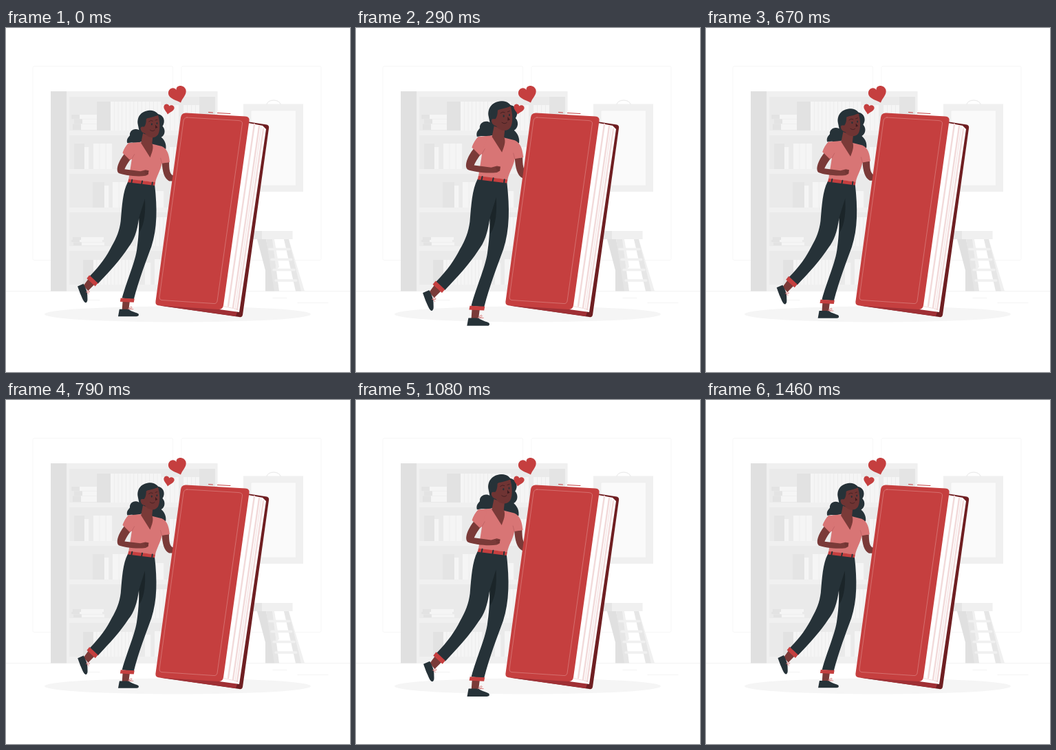
Animation of 500 by 500 pixels, one loop 1.5 s. Source, as an HTML page:

```html
<!DOCTYPE html>
<html lang="en">
<head>
<meta charset="utf-8">
<title>Reader and book</title>
<style>
html, body { margin: 0; height: 100%; overflow: hidden; background: #fff; }
svg { display: block; width: 100vw; height: 100vh; }
.dark { fill: #263238; }
.skin { fill: #7a3a38; }
.face { fill: #6f3433; }
.red { fill: #c53f3f; }
.shirt { fill: #d87575; }
.line { fill: none; stroke-linecap: round; }
</style>
</head>
<body>
<svg viewBox="0 0 500 500">
  <g class="line" stroke="#f5f5f5" stroke-width=".8">
    <rect x="39" y="55.5" width="203.5" height="282" rx="2"/>
    <rect x="255" y="55.5" width="203" height="282" rx="2"/>
    <path stroke="#f0f0f0" d="M0 382.500H500M388 392.500h20M424 399.500h44M110 395.500h26"/>
  </g>

  <path fill="#e0e0e0" d="M65 92h23v290.500H65z"/>
  <path fill="#f0f0f0" d="M88 92h219.500v290.500H88z"/>
  <g id="shelves"></g>

  <path fill="#f0f0f0" d="M345 110.500h87V238h-87z"/>
  <path fill="#fafafa" stroke="#ebebeb" stroke-width=".6" d="M356 120h65.500v109H356z"/>
  <path class="line" stroke="#e6e6e6" d="M379 110.500C381 103 397 103 399 110.500"/>

  <path fill="#e0e0e0" d="M365 307h13l12 58v17.500h-13v-30z"/>
  <path fill="#f0f0f0" d="M358 295h58.500v12H358zM386 307h4l7 40-4 5zM404 307h7l23 75.500h-8z"/>
  <path fill="#e6e6e6" d="M358 295h14v12h-14zM378 307h9l10 75.500h-7zM404 307h7l18 75.500h-8z"/>
  <path class="line" stroke="#f0f0f0" stroke-width="3.500" d="M383 321.500h29M386 336.500h29M389 351.500h30M392 367h30"/>

  <ellipse cx="249.500" cy="416" rx="193.500" ry="11.500" fill="#f5f5f5"/>

  <g id="woman">
    <!-- Hair behind the face -->
    <path class="dark" d="M192 132C191 119 200 112 212 112C218 112.500 221 115 223 117.500C232 119 235 129 230 136C235 141 234 150 228 153C234 158 236 165 235 171C227 169 218 170 213 166L201 158C194 163 186 161 182 161L176 162C174 155 179 152 180 150C179 143 187 138 194 142Z"/>
    <path class="skin" d="M229 192L240 191C240 202 241 208 245 211H252V220H240C232 216 230 205 229 192Z"/>
    <!-- Lower body -->
    <path class="skin" d="M117 369L126 378L116 388L109 380ZM169 403H180L178 418H168Z"/>
    <path class="dark" d="M100 381L109 377C112 383 115 388 115 395C115 401 116 404 113 406C109 406 107 398 104 392ZM164 416L178 416C183 420 190 421 193 423Q195 427 190 427H162Z"/>
    <path class="line" stroke="#d87575" stroke-width=".9" d="M113 390C116 386 119 388 118 390L114 390L117 393M177 416L182 412C185 414 181 415 179 416L185 416"/>
    <path class="dark" d="M177 221L218 226C222 262 222 292 213 320C205 342 194 370 186 401L168 399C176 370 189 342 191 322C194 301 194 287 194 276C191 298 186 311 178 321C165 341 149 358 131 377L118 366C135 349 145 334 152 320C160 306 164 296 166 281C168 258 169 236 177 221Z"/>
    <path fill="#1b2529" d="M203 247L194 276L195 298C203 284 204 266 203 247Z"/>
    <path class="red" d="M118 364L131 376L127 381L114 369ZM166 399L187 400L186 405.500L165 404.500Z"/>
    <!-- Upper body -->
    <path class="shirt" d="M178 162L201 160L229 167C238 171 240 181 241 191L229 193C227 204 221 212 219 222L178 218L183 186L180 188L169 177C171 171 174 166 178 162Z"/>
    <path class="line" stroke="#b95d60" stroke-width=".7" d="M183 186L187 179M229 193L227 185"/>
    <path class="skin" d="M200 147L215 153L214 162C217 169 214 176 211 184L197 162Z"/>
    <path class="red" d="M178 217L219 222L218 227L177 222Z"/>
    <path class="line" stroke="#263238" stroke-width="2" d="M183.500 218L182.500 222.500M199 220L198 224.500M214.500 222L214 226"/>
    <path class="skin" d="M173 177L181 187C177 192 173 199 172 202L196 205L204 203L209 204L208 210L204 212C190 214 170 211 163 208C157 203 164 187 173 177Z"/>
    <path class="line" stroke="#5e2929" stroke-width=".7" d="M203 206L208 206M204 208.500L208 208.500"/>
    <path class="shirt" d="M178 162L190 165L180 188L169 177C171 171 174 166 178 162Z"/>
    <!-- Face -->
    <path class="face" d="M203 124C210 124 219 121 223 119C226 128 227 142 223 149C218 156 207 154 203 147C197 146 194 138 199 136C203 136 205 130 203 124Z"/>
    <path class="dark" d="M193 130C194 118 203 113 214 113L224 119C217 121 209 122 205 125C205 131 204 134 202 137L196 137Z"/>
    <ellipse class="dark" cx="213.500" cy="133" rx="1.100" ry="1.700"/>
    <ellipse class="dark" cx="221.500" cy="131.500" rx="1" ry="1.600"/>
    <path fill="#3c1c20" d="M219 134L222.500 138L219 139.500Z"/>
    <path class="line" stroke="#3c1c20" stroke-width=".8" d="M209 129Q212 126 215 128M219 127L222 126M211 142Q215 145 218 142"/>
  </g>

  <!-- Book -->
  <path fill="#6f1f22" d="M350 136L379 140.500Q383 141.500 382 146L344 417Q343 421 339 420L228 404Z"/>
  <path fill="#a03035" d="M222 402L312 407L336 413L334 419L226 404Z"/>
  <path fill="#fff" d="M352 138L373 142L378 147L339 413L310 409Z"/>
  <path class="line" stroke="#f2dada" stroke-width="2.400" d="M361 140L323 404M368 143L330 406M374 147L336 409"/>
  <path class="line" stroke="#e8c4c4" stroke-width=".6" d="M371 144L333 408M314 404L337 409"/>
  <path class="red" d="M262 123.500L348 128.500Q354.500 129 353.500 135L316 403Q315 409.500 308 409L223 403.500Q216.500 403 217.500 397L254 130Q255 123 262 123.500Z"/>
  <path class="line" stroke="#dc8583" stroke-width=".7" d="M263 130L338 134.500Q344 135 343.500 139L307 397Q306 401 302 400.500L226 395.500Q222.500 395 223 391L258 135Q259 130 263 130Z"/>
  <path class="line" stroke="#c53f3f" d="M294.500 122.500L300.500 123M307.500 123.500L326 124.500"/>

  <!-- Hearts -->
  <path class="red" d="M254 108.500C248 105 238 103 236.300 97C234 88 244 84 247.500 90C247 82 259 82 261.500 90C263 97 256 102 254 108.500Z"/>
  <path class="red" d="M235 125.500C233 121 228.500 118 229.500 113.500C231 109 236 110 237.500 113.500C240 110.500 245.500 113 244.500 117C243.500 121 238.500 122 235 125.500Z"/>
</svg>
<script>
const shelves = document.getElementById("shelves");
const woman = document.getElementById("woman");

function box(x, y, width, height, fill) {
  const rect = document.createElementNS("http://www.w3.org/2000/svg", "rect");
  Object.entries({ x, y, width, height, fill }).forEach(([k, v]) => rect.setAttribute(k, v));
  shelves.append(rect);
}

// Upright books between two x positions
function books(from, to, step, top, bottom) {
  for (let x = from; x < to; x += step) box(x, top, step - 0.8, bottom - top, "#f5f5f5");
}

function stack(x, y, h) {
  box(x + 11, y, 34, h, "#f5f5f5");
  box(x, y, 12, h, "#e3e3e3");
}

for (let i = 0; i < 5; i++) box(92, 100 + 56 * i, 212, 49, "#eaeaea");

stack(95, 126, 6);
stack(99, 132.5, 6.5);
stack(97, 139.5, 8.5);
box(132, 107, 20, 42, "#e2e2e2");
books(152, 225, 5.7, 107, 149);
books(226, 250, 6.5, 112, 149);
books(258, 283, 6, 112, 149);
box(281, 100, 23, 49, "#e4e4e4");

box(99, 168, 15, 37, "#e4e4e4");
books(114, 120, 7, 173, 205);
books(127, 154, 9.3, 168, 205);
books(238, 248, 6, 173, 205);

box(126, 224, 17, 37, "#e4e4e4");
books(143, 149, 7, 229, 261);
books(155, 180, 9.5, 224, 261);
books(218, 230, 12, 237, 261);

stack(97, 304, 4);
stack(95, 308, 3);
stack(98, 311.5, 4.5);
books(190, 236, 5.6, 275, 317);

box(112, 337, 15, 36, "#e2e2e2");
books(127, 182, 5.2, 337, 373);
books(202, 211, 9, 341, 373);
books(216, 226, 10, 336, 373);

// Time in ms and strength of the heartbeat
const beat = [[0, 0.05], [170, 0.58], [300, 1], [460, 0.58], [670, 0.23], [790, 0.03],
  [920, 0.27], [1125, 1], [1210, 0.58], [1460, 0], [1500, 0.05]];

function strength(t) {
  const i = beat.findIndex(([time]) => time > t);
  const [t0, v0] = beat[i - 1], [t1, v1] = beat[i];
  return v0 + (v1 - v0) * (t - t0) / (t1 - t0);
}

function draw() {
  const scale = 0.945 + 0.0945 * strength(performance.now() % 1500);
  woman.setAttribute("transform", `translate(181 269.5) scale(${scale}) translate(-181 -269.5)`);
  requestAnimationFrame(draw);
}
draw();
</script>
</body>
</html>
```
